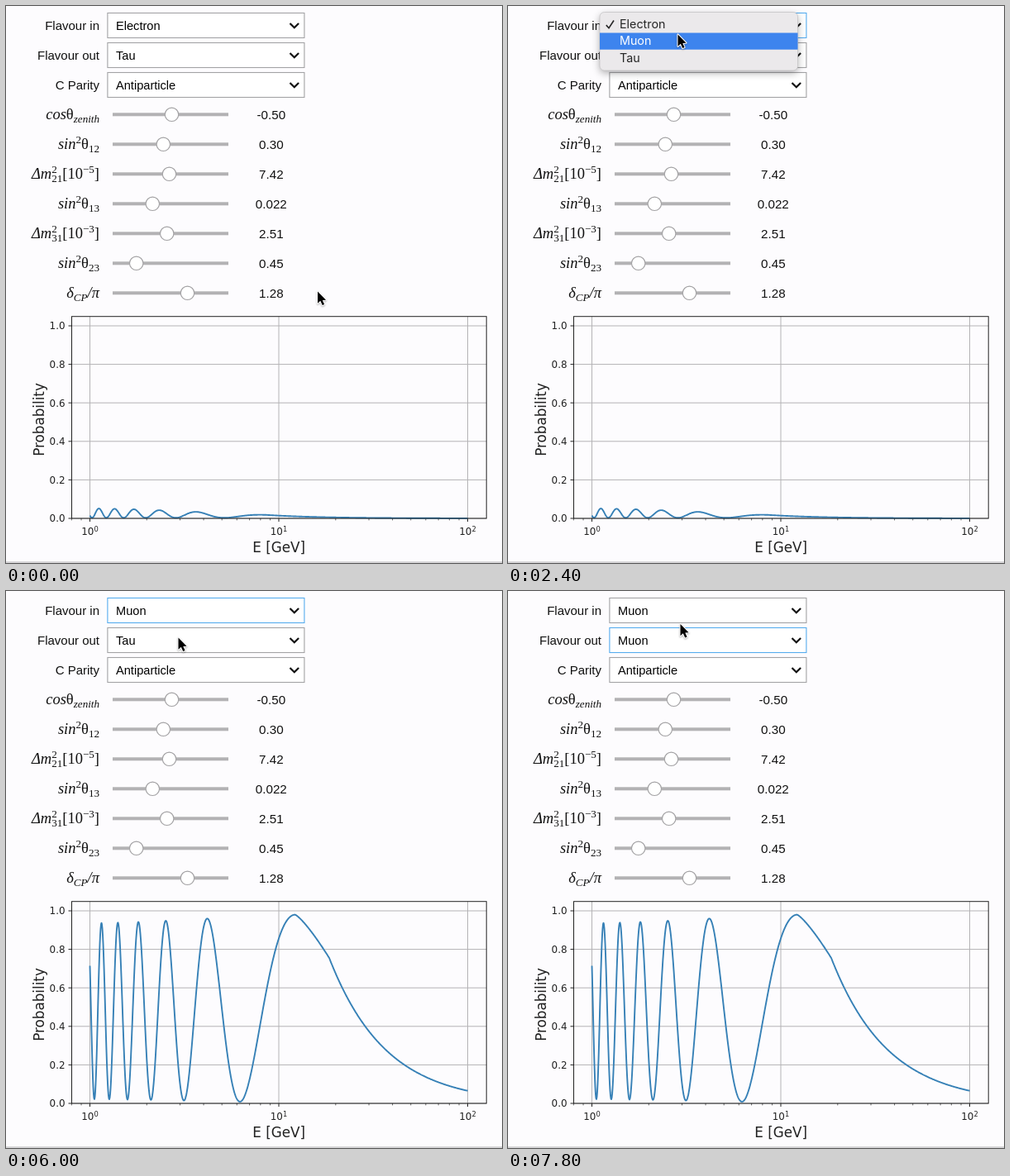
Animation, 600 px wide and 674 px high, one loop 8000 ms. Source, as an HTML page with a canvas:

```html
<!DOCTYPE html>
<html lang="en">
<head>
<meta charset="utf-8">
<title>Oscillation probability</title>
<style>
html, body { margin: 0; width: 100%; height: 100%; overflow: hidden; background: #fdfcfe; }
canvas { display: block; width: 600px; height: 674px; }
</style>
</head>
<body>
<canvas id="stage"></canvas>
<script>
const W = 600, H = 674, LOOP = 8000, STEP = 200;
const canvas = document.getElementById('stage');
const ctx = canvas.getContext('2d');
const dpr = window.devicePixelRatio || 1;
canvas.width = W * dpr;
canvas.height = H * dpr;

const SANS = '"Liberation Sans", Arial, sans-serif';
const SERIF = '"Liberation Serif", serif';
const PLOT = '"DejaVu Sans", sans-serif';
const MENU = 'Inter, sans-serif';
const FLAVOURS = ['Electron', 'Muon', 'Tau'];
const ITEM = 20.2;

// Handle x, value, label in runs: ^ superscript, _ subscript
const SLIDERS = [
  [200.5, '-0.50', 'cos|θ|_zenith'],
  [190.3, '0.30', 'sin|^2|θ|_12'],
  [197.5, '7.42', 'Δ|m|^2|_21|[10|^−5|]'],
  [177.3, '0.022', 'sin|^2|θ|_13'],
  [194.7, '2.51', 'Δ|m|^2|_31|[10|^−3|]'],
  [157.7, '0.45', 'sin|^2|θ|_23'],
  [219.5, '1.28', 'δ|_CP|/π']
];

const ease = u => {
  u = Math.min(1, Math.max(0, u));
  return u * u * (3 - 2 * u);
};

function text(str, x, y, font, align = 'left', color = '#111') {
  ctx.font = font;
  ctx.textAlign = align;
  ctx.fillStyle = color;
  ctx.fillText(str, x, y);
}

function line(points, color, width) {
  ctx.beginPath();
  points.forEach(([x, y]) => ctx.lineTo(x, y));
  ctx.strokeStyle = color;
  ctx.lineWidth = width;
  ctx.stroke();
}

function mathLabel(label, right, y) {
  const runs = label.split('|');
  const layout = (x, paint) => {
    runs.forEach((run, i) => {
      const sup = run[0] === '^', sub = run[0] === '_';
      const str = sup || sub ? run.slice(1) : run;
      const italic = /[a-zδπ]/i.test(str) ? 'italic ' : '';
      const font = italic + (sup || sub ? 13.1 : 18.5) + 'px ' + SERIF;
      ctx.font = font;
      if (paint) text(str, x, y + (sup ? -6.5 : sub ? 4 : 0), font);
      const stacked = sup && runs[i + 1]?.[0] === '_';
      if (!stacked) x += ctx.measureText(str).width;
    });
    return x;
  };
  layout(right - layout(0, false), true);
}

function select(label, value, y, focused) {
  text(label, 113, y + 5, '15px ' + SANS, 'right');
  ctx.fillStyle = '#fff';
  ctx.fillRect(123, y - 15, 238, 30);
  ctx.strokeStyle = focused ? '#55acee' : '#a3a3a5';
  ctx.lineWidth = 1.1;
  ctx.strokeRect(122.9, y - 15, 238, 30);
  text(value, 133, y + 5, '14.6px ' + SANS, 'left', '#000');
  line([[343.5, y - 2.6], [348.8, y + 2.8], [354.1, y - 2.6]], '#111', 2.2);
}

function slider([pos, value, label], y) {
  mathLabel(label, 113, y + 5.5);
  ctx.fillStyle = '#b3b2b4';
  ctx.fillRect(129, y - 2, 140, 4);
  ctx.beginPath();
  ctx.arc(pos, y, 8.2, 0, Math.PI * 2);
  ctx.fillStyle = '#fff';
  ctx.fill();
  ctx.strokeStyle = '#a3a2a4';
  ctx.lineWidth = 1.1;
  ctx.stroke();
  text(value, 320.8, y + 5.5, '15.2px ' + SANS, 'center');
}

const plotX = energy => 101.5 + 228.5 * Math.log10(energy);
const plotY = p => 620 - 233 * p;

// Oscillation in 1/energy between lo and hi; turns counts periods from the last peak
const swing = (turns, lo, hi) => lo + (hi - lo) * (1 + Math.cos(2 * Math.PI * turns)) / 2;

function electronToTau(energy) {
  const peak = 8.6;
  if (energy > peak) return .018 * (peak / energy) ** 1.5;
  const turns = (1 / energy - 1 / peak) / .156;
  return swing(turns, .003, .053 - .035 * Math.exp(-.6 * turns));
}

function muonToTau(energy) {
  const peak = 12.2, bend = 18.5;
  if (energy > bend) return .755 * (bend / energy) ** 1.45;
  if (energy > peak) {
    const u = Math.log(energy / peak) / Math.log(bend / peak);
    return .98 - .225 * u ** 1.25;
  }
  const turns = (1 / energy - 1 / peak) / .1573;
  const fade = Math.exp(-.6 * turns);
  return swing(turns, .022 - .018 * fade, .935 + .045 * fade);
}

function curve(probability) {
  const points = [];
  for (let i = 0; i <= 914; i++) {
    const energy = 10 ** (i / 457);
    points.push([plotX(energy), plotY(probability(energy))]);
  }
  ctx.lineJoin = 'round';
  line(points, '#3680b6', 1.9);
  ctx.lineJoin = 'miter';
}

function plot(probability) {
  const L = 79.5, R = 581.2, T = 375.7, B = 620, ink = '#222';
  const tick = '11.9px ' + PLOT;
  for (let i = 0; i <= 5; i++) {
    const y = plotY(i / 5);
    line([[L, y], [R, y]], '#b4b3b5', 1);
    line([[L - 4, y], [L, y]], ink, 1);
    text((i / 5).toFixed(1), 71.5, y + 4.4, tick, 'right', ink);
  }
  for (let d = 0; d <= 2; d++) {
    const x = plotX(10 ** d);
    line([[x, T], [x, B]], '#b4b3b5', 1);
    line([[x, B], [x, B + 4]], ink, 1);
    text('10', x - 10.3, 640, tick, 'left', ink);
    text(String(d), x + 5, 635.6, '8.3px ' + PLOT, 'left', ink);
  }
  for (let d = -1; d < 2; d++) {
    for (let n = d < 0 ? 8 : 2; n < 10; n++) {
      const x = plotX(n * 10 ** d);
      line([[x, B], [x, B + 2.4]], ink, .7);
    }
  }
  curve(probability);
  ctx.strokeStyle = ink;
  ctx.lineWidth = 1;
  ctx.strokeRect(L, T, R - L, B - T);
  text('E [GeV]', 330.2, 661, '16.8px ' + PLOT, 'center', ink);
  ctx.save();
  ctx.translate(45.6, 500.5);
  ctx.rotate(-Math.PI / 2);
  text('Probability', 0, 0, '16.8px ' + PLOT, 'center', ink);
  ctx.restore();
}

function menu(top, checked, tipY, alpha) {
  const x = 111, w = 239.5, h = 70.5;
  const active = Math.floor((tipY - top - 4.8) / ITEM);
  ctx.save();
  ctx.globalAlpha = alpha;
  ctx.beginPath();
  ctx.roundRect(x, top, w, h, 5.5);
  ctx.shadowColor = 'rgba(0,0,0,.32)';
  ctx.shadowBlur = 10 * dpr;
  ctx.shadowOffsetY = 3 * dpr;
  ctx.fillStyle = '#ebe9eb';
  ctx.fill();
  ctx.shadowColor = 'transparent';
  ctx.strokeStyle = '#c2c0c2';
  ctx.lineWidth = .7;
  ctx.stroke();
  FLAVOURS.forEach((name, i) => {
    const y = top + 14.8 + ITEM * i;
    const color = i === active ? '#fff' : '#262626';
    if (i === active) {
      ctx.fillStyle = '#3d84ee';
      ctx.fillRect(x, y - 10, w, ITEM);
    }
    text(name, 135, y + 4.8, '14.3px ' + MENU, 'left', color);
    if (i === checked) line([[118.8, y + .8], [122, y + 4.4], [128, y - 4.8]], color, 1.6);
  });
  ctx.restore();
}

function pointerAt(t) {
  const move = (start, end) => ease((t - start) / (end - start));
  return [
    377 - 171.5 * move(0, 1000) + 3 * move(3400, 3800),
    346 - 322 * move(0, 1000) + 11 * move(2000, 2400) + 3 * move(2400, 3000)
      + 19 * move(3400, 3800) - 16.5 * move(6400, 7200)
  ];
}

function pointer([x, y]) {
  ctx.save();
  ctx.translate(x, y - .6);
  ctx.scale(.95, .95);
  ctx.beginPath();
  [[0, 0], [0, 15.2], [3.5, 12], [6, 17.6], [8.5, 16.5], [6.1, 11.1], [10.6, 10.8]]
    .forEach(p => ctx.lineTo(...p));
  ctx.closePath();
  ctx.lineJoin = 'round';
  ctx.strokeStyle = '#fff';
  ctx.lineWidth = 2.2;
  ctx.shadowColor = 'rgba(0,0,0,.3)';
  ctx.shadowBlur = 2 * dpr;
  ctx.shadowOffsetY = dpr;
  ctx.stroke();
  ctx.shadowColor = 'transparent';
  ctx.fillStyle = '#000';
  ctx.fill();
  ctx.restore();
}

function draw(t) {
  const tip = pointerAt(t);
  const focus = t < 400 ? -1 : t < 1600 ? 2 : t < 6200 ? 0 : 1;
  ctx.setTransform(dpr, 0, 0, dpr, 0, 0);
  ctx.fillStyle = '#fdfcfe';
  ctx.fillRect(0, 0, W, H);

  select('Flavour in', t < 2800 ? 'Electron' : 'Muon', 23.5, focus === 0);
  select('Flavour out', t < 7600 ? 'Tau' : 'Muon', 59.5, focus === 1);
  select('C Parity', 'Antiparticle', 95.5, focus === 2);
  SLIDERS.forEach((s, i) => slider(s, 131.3 + 36 * i));
  plot(t < 5200 ? electronToTau : muonToTau);
  line([[0, 673], [W, 673]], '#b0afb1', 1);

  if (t >= 1600 && t < 3000) menu(7.5, 0, tip[1], t < 2800 ? 1 : .25);
  if (t >= 6200 && t < 7800) menu(3.2, 2, tip[1], t < 7600 ? 1 : .25);
  pointer(tip);
}

function tick() {
  const t = performance.now() % LOOP;
  draw(Math.floor(t / STEP) * STEP);
  requestAnimationFrame(tick);
}
tick();
</script>
</body>
</html>
```
